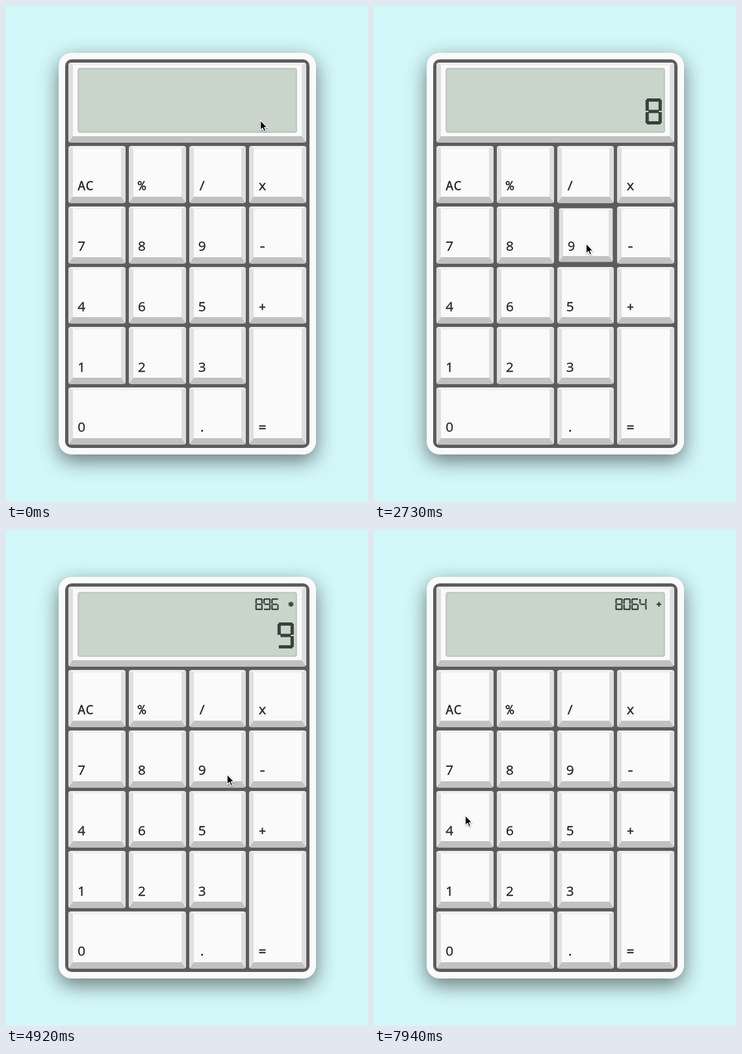
These frames come from a looping animation (557 by 762 pixels, 8000 ms). An HTML page:

```html
<!DOCTYPE html>
<html lang="en">
<head>
<meta charset="utf-8">
<title>Calculator</title>
<style>
* { box-sizing: border-box; }
html, body { margin: 0; width: 100%; height: 100%; overflow: hidden; background: #d2f8fa; }
.body {
  position: absolute; left: 81px; top: 72px; width: 396px; height: 617px;
  padding: 10px; border-radius: 20px; background: #fafafa;
  box-shadow: 0 10px 30px rgba(50, 50, 50, .65);
}
.pad {
  display: grid; width: 376px; height: 597px; padding: 5px; gap: 5px;
  grid-template: 123px repeat(5, 1fr) / repeat(4, 1fr);
  border-radius: 10px; background: #5c5c5c;
}
.key {
  position: relative; border: 7px solid #dfdfdf; border-width: 4px 7px 10px;
  border-top-color: #efefef; border-bottom-color: #c1c1c1;
  border-radius: 4px; background: #fafafa;
}
.key span {
  position: absolute; left: 7px; bottom: 5.7px; color: #222; -webkit-text-stroke: .3px #222;
  font: 20.8px/24px "Noto Sans Mono", monospace;
}
.key .digit { left: 7.3px; font-family: "Open Sans", sans-serif; }
.down { transform: scale(.945); }
.down span { bottom: 4.4px; }
.screen { grid-column: span 4; }
.lcd {
  position: absolute; left: 7px; top: 4px; width: 338px; height: 100px;
  border: 3px solid #c0cdc3; border-radius: 4px; background: #c9d5cb;
}
svg { position: absolute; left: 0; top: 0; }
</style>
</head>
<body>
<div class="body"><div class="pad"><div class="key screen"><div class="lcd"></div></div></div></div>
<svg width="557" height="762">
  <g id="lcd" fill="none" stroke="#3a403b" stroke-width="5"></g>
  <path id="cursor" d="M0 0V15L3.4 11.9 5.8 17.2 8.2 16.2 6 11H10.4z" stroke="#fff" stroke-width="1.1"
    style="filter: drop-shadow(0 1px 1px rgba(0,0,0,.35))"/>
</svg>
<script>
const LOOP = 8000, TICK = 88, DWELL = 2, MAX_TRAVEL = 7;
const pad = document.querySelector('.pad');
const lcd = document.getElementById('lcd');
const cursor = document.getElementById('cursor');

const keys = {};
for (const label of 'AC % / x 7 8 9 - 4 6 5 + 1 2 3 = 0 .'.split(' ')) {
  const key = keys[label] = document.createElement('div');
  key.className = 'key';
  key.innerHTML = `<span class="${/\d/.test(label) ? 'digit' : ''}">${label}</span>`;
  pad.append(key);
}
keys['='].style.gridRow = 'span 2';
keys['0'].style.gridColumn = 'span 2';

// Seven segments in a 25 x 40 box
const bar = (y, inset) => `M${inset} ${y}H${25 - inset}`;
const post = (x, y) => `M${x} ${y}v17`;
const segments = {
  a: bar(2.5, 2), g: bar(20, 4.5), d: bar(37.5, 2),
  f: post(2.5, 2), b: post(22.5, 2), e: post(2.5, 21), c: post(22.5, 21)
};
const shapes = { 0: 'abcdef', 4: 'bcfg', 6: 'acdefg', 8: 'abcdefg', 9: 'abcdfg' };
const signs = { '+': 'M12.5 12v16m-8-8h16', '*': 'M12.5 11v18m-8-13.5l16 9m-16 0l16-9' };

function line(text, right, top, scale) {
  const glyphs = [...text].map((ch, i) => {
    const d = signs[ch] || [...(shapes[ch] || '')].map(s => segments[s]).join('');
    return `<path d="${d}" transform="translate(${(i - text.length) * 27.2 + 1.1} 0)"/>`;
  });
  return `<g transform="translate(${right} ${top}) scale(${scale})">${glyphs.join('')}</g>`;
}

// Cursor stops: arrival tick, x, y and the key clicked there
const stops = [
  [0, 391.5, 175.5], [2, 391.5, 175.5], [6, 518, 222], [11, 285, 270], [13, 285, 270], [17, 183, 298],
  [22, 214, 342, '8'], [30, 326.5, 365, '9'], [37, 240, 438, '6'], [47, 397.5, 272.5, 'x'],
  [53, 336, 363, '9'], [61, 394.5, 533.5, '='], [81, 412, 456, '+'], [90, 140.5, 438.5]
];
const clicks = stops.filter(s => s[3]).map(([at, , , key]) => ({ key, release: at + DWELL }));

function cursorAt(n) {
  const i = stops.findIndex(s => s[0] > n);
  if (i < 0) return stops.at(-1).slice(1, 3);
  const [t0, x0, y0, key] = stops[i - 1], [t1, x1, y1] = stops[i];
  const travel = Math.min(t1 - t0 - (key ? DWELL : 0), MAX_TRAVEL);
  const k = Math.max(0, 1 - (t1 - n) / travel);
  const ease = k * k * (3 - 2 * k);
  return [x0 + (x1 - x0) * ease, y0 + (y1 - y0) * ease];
}

function calculate(entered) {
  let small = '', large = '';
  for (const key of entered) {
    if (/\d/.test(key)) {
      large += key;
    } else if (key === '=') {
      small += ' ' + large;
      const [a, sign, b] = small.split(' ');
      large = String(sign === '*' ? a * b : +a + +b);
    } else {
      small = `${large} ${key === 'x' ? '*' : key}`;
      large = '';
    }
  }
  return [small, large];
}

function draw(n) {
  const [small, large] = calculate(clicks.filter(c => c.release <= n).map(c => c.key));
  lcd.innerHTML = line(small, 444.6, 105, .452) + line(large, 443.9, 142, 1);
  const pressed = clicks.find(c => c.release - 1 === n);
  for (const label in keys) keys[label].classList.toggle('down', pressed?.key === label);
  cursor.setAttribute('transform', `translate(${cursorAt(n)})`);
  cursor.setAttribute('visibility', n >= 2 && n < 6 ? 'hidden' : 'visible');
}

let last = -1;
function frame() {
  const n = Math.floor((performance.now() % LOOP + 14) / TICK);
  if (n !== last) draw(last = n);
  requestAnimationFrame(frame);
}
frame();
</script>
</body>
</html>
```
